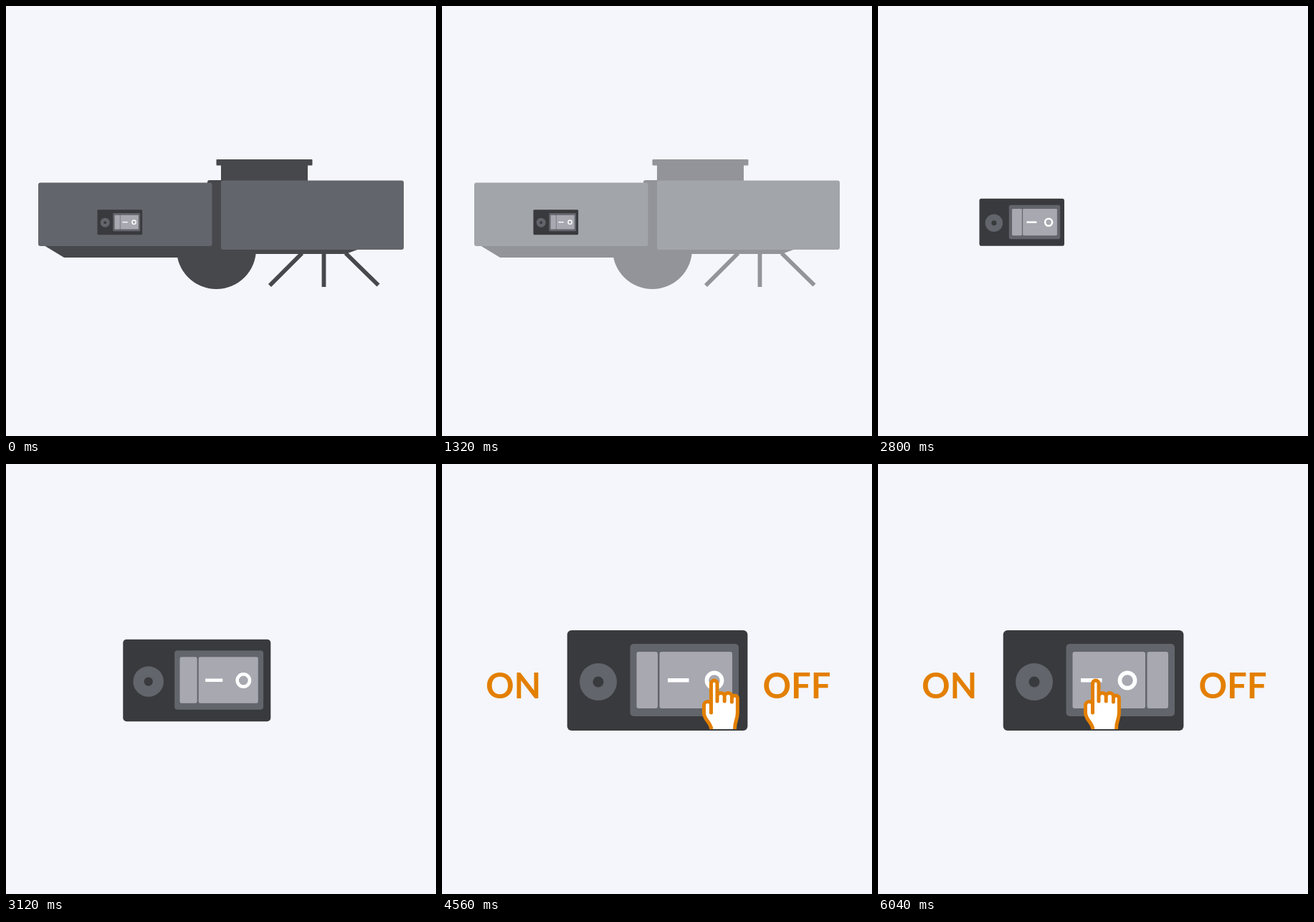
Write an HTML page that moves like this. It is 600 px wide and 600 px high and loops after 8960 ms.

```html
<!DOCTYPE html>
<html lang="en">
<head>
<meta charset="utf-8">
<title>Power switch</title>
<style>
  html, body { margin: 0; height: 100%; overflow: hidden; background: #f4f6fb; }
  svg { display: block; width: 100%; height: 100%; }
  text { font: 700 49px Lato, "Open Sans", sans-serif; fill: #e37f00; }
  .dark { fill: #47484c; }
  .body { fill: #62656b; }
  .case { fill: #393a3d; }
  .key { fill: #a7a8b0; }
</style>
</head>
<body>
<svg viewBox="0 0 600 600">
  <defs>
    <g id="face">
      <rect class="key" x="303.5" y="262" width="101.5" height="79" rx="3"/>
      <rect x="315" y="299" width="29.5" height="5.5" fill="#fff"/>
      <circle cx="380" cy="302" r="10.6" fill="none" stroke="#fff" stroke-width="5.6"/>
    </g>
    <rect id="edge" class="key" x="271.5" y="262" width="29.5" height="79" rx="3"/>
  </defs>

  <g id="robot">
    <g class="dark">
      <path d="M53 334L81 351H300V334Z"/>
      <circle cx="293.5" cy="339.5" r="55.5"/>
      <rect x="281" y="243" width="30" height="98" rx="3"/>
      <rect x="293.5" y="214" width="134" height="8.5" rx="1"/>
      <rect x="300" y="221" width="121" height="25"/>
      <path d="M340 338H496L474 346H340Z"/>
    </g>
    <path d="M413 345L368 390M443.500 345V392M474 345L519.500 389.500" stroke="#47484c" stroke-width="5.800"/>
    <rect class="body" x="45" y="246.500" width="242.500" height="88.500" rx="3"/>
    <rect class="body" x="300" y="243.500" width="255" height="96.500" rx="3"/>
  </g>

  <g id="panel">
    <rect class="case" x="174.700" y="232" width="251.700" height="140" rx="6"/>
    <circle class="body" cx="218" cy="304" r="26"/>
    <circle class="case" cx="218" cy="304" r="7.500"/>
    <rect class="body" x="262.500" y="251" width="151.500" height="101" rx="5"/>
    <g id="off"><use href="#edge"/><use href="#face"/></g>
    <g id="on"><use href="#face" x="-32"/><use href="#edge" x="104"/></g>
  </g>

  <g id="guide">
    <text x="61" y="326.500">ON</text>
    <text x="447.500" y="326.500">OFF</text>
    <path id="hand" fill="#fff" stroke="#e37f00" stroke-width="5" stroke-linejoin="round"
      d="M376 370C374 359 365.500 357 365.500 347V337C365.500 330 375.500 330 375.500 336V347
         V306.200a4.250 4.250 0 0 1 8.500 0V331V324a5.100 4.500 0 0 1 10.200 0V331
         V324a5.100 4.500 0 0 1 10.200 0V332V327a4 4 0 0 1 8 0V347C412.400 357 408.500 358 408.500 370"/>
  </g>
</svg>
<script>
const LOOP = 8960, TICK = 40;
const el = id => document.getElementById(id);
const [robot, panel, off, on, guide, hand] =
  ["robot", "panel", "off", "on", "guide", "hand"].map(el);

const ramp = (t, start, length) => Math.min(1, Math.max(0, (t - start) / length));
const ease = u => u * u * (3 - 2 * u);
const mix = (a, b, u) => a + (b - a) * u;

// The robot keeps a faint trace until the zoom begins.
function robotOpacity(t) {
  if (t < 1120) return 1;
  if (t >= 2480) return 0;
  return mix(0.9, 0.04, ramp(t, 1160, 400));
}

function draw(t) {
  robot.style.opacity = robotOpacity(t);

  const zoom = ease(ramp(t, 2440, 1000));
  const x = mix(158.8, 300.5, zoom), y = mix(301.7, 302, zoom);
  panel.setAttribute("transform",
    `translate(${x} ${y}) scale(${mix(0.249, 1, zoom)}) translate(-300.5 -302)`);

  guide.style.opacity = ramp(t, 4320, 240);

  const flip = ease(ramp(t, 5720, 320));
  hand.setAttribute("transform", `translate(${-76 * flip} 0)`);
  off.style.opacity = 1 - flip;
  on.style.opacity = flip;
}

const start = performance.now();
function frame() {
  const t = (performance.now() - start) % LOOP;
  draw(Math.floor(t / TICK) * TICK);
  requestAnimationFrame(frame);
}
frame();
</script>
</body>
</html>
```
